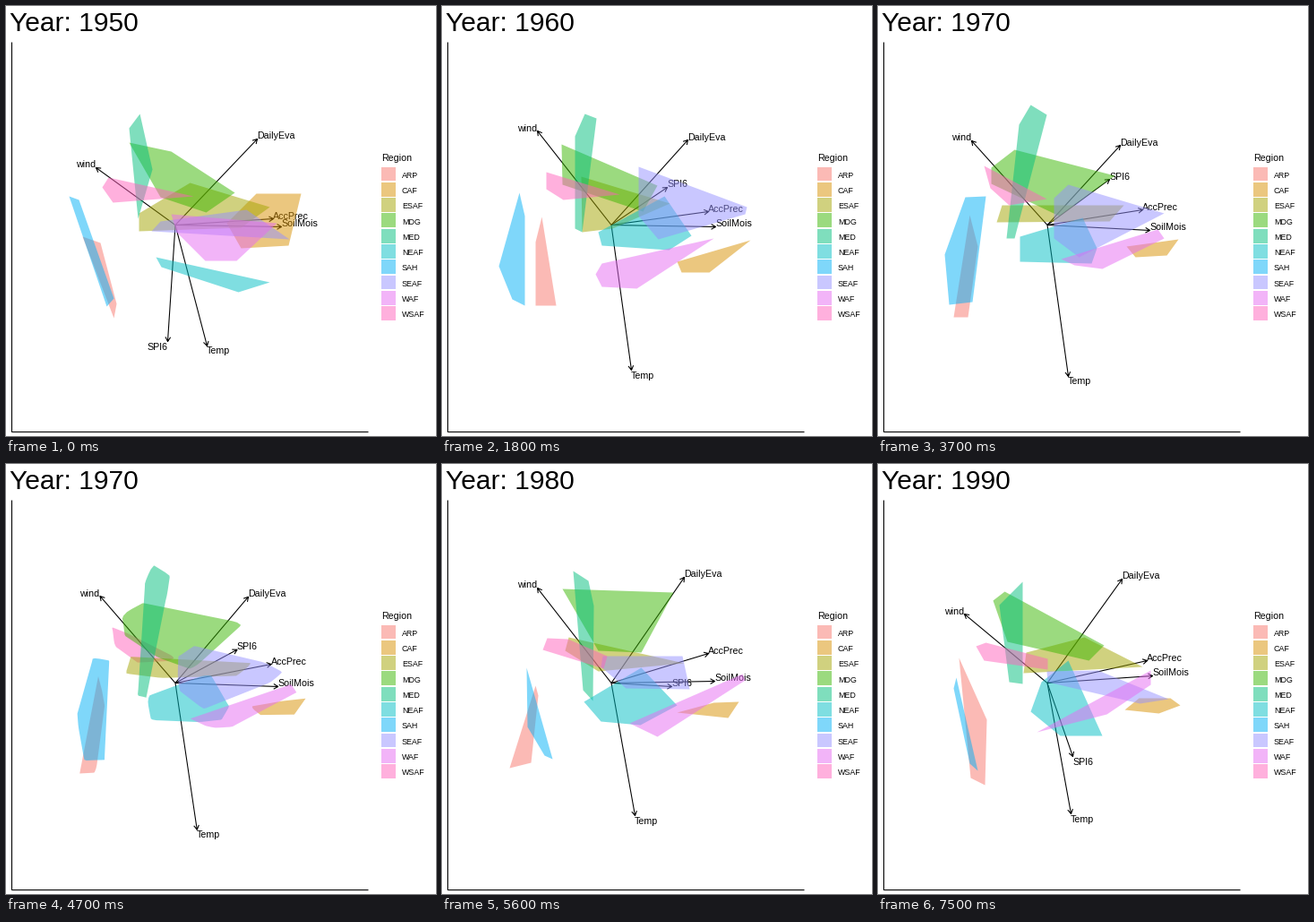
A matplotlib script for the animation above (8 s loop, 480x480 px).

```python
import numpy as np
import matplotlib.pyplot as plt
from matplotlib.animation import FuncAnimation
from matplotlib.patches import Polygon, Rectangle

plt.rcParams.update({"font.family": "Liberation Sans", "toolbar": "None"})

SIZE = 480
FRAMES, INTERVAL = 80, 100
HOLD, STEPS, CYCLE = 6, 12, 19      # first pause, steps per change, frames per decade
FIRST_YEAR = 1950
ORIGIN = np.array([188.5, 244])
MIDDLE = np.array([204, 256])       # labels are pushed away from this point
CAP_HEIGHT = 9
RING_POINTS = 50

regions = {}
arrows = {}


def sort_ring(corners):
    """Order the corners of a convex shape by angle around its middle."""
    corners = np.array(corners, float)
    x, y = (corners - corners.mean(axis=0)).T
    return corners[np.argsort(np.arctan2(y, x))]


def region(name, color, *decades):
    regions[name] = color, [sort_ring(corners) for corners in decades]


def arrow(name, *tips):
    arrows[name] = np.array(tips, float)


# Key corners and arrow tips, one entry per decade.
region("ARP", "#F8766D",
       [(85, 257), (105, 264), (123, 332), (120, 348)],
       [(111, 235), (127, 334), (104, 334), (104, 263)],
       [(102, 233), (111, 268), (100, 347), (84, 347)],
       [(104, 247), (107, 258), (99, 333), (75, 339)],
       [(90, 216), (121, 285), (119, 358), (103, 350)])
region("CAF", "#D89000",
       [(279, 209), (329, 209), (315, 267), (262, 270), (246, 242)],
       [(262, 285), (344, 261), (298, 297), (267, 297)],
       [(277, 268), (335, 260), (322, 278), (287, 280)],
       [(331, 265), (319, 283), (262, 277), (303, 266)],
       [(291, 261), (326, 261), (337, 269), (313, 278), (275, 274)])
region("ESAF", "#A3A500",
       [(148, 251), (148, 231), (205, 197), (294, 224), (262, 247)],
       [(155, 190), (254, 220), (190, 248), (156, 252)],
       [(138, 222), (274, 222), (258, 240), (132, 241)],
       [(141, 193), (270, 222), (174, 231), (137, 208)],
       [(165, 210), (230, 193), (295, 226), (162, 233)])
region("MDG", "#39B600",
       [(137, 152), (184, 162), (255, 208), (223, 230), (172, 213)],
       [(133, 154), (240, 200), (224, 229), (134, 199)],
       [(152, 160), (264, 189), (202, 234), (126, 198), (126, 180)],
       [(134, 139), (258, 143), (222, 210), (174, 208)],
       [(141, 142), (252, 202), (235, 219), (144, 198), (128, 152)])
region("MED", "#00BF7D",
       [(149, 120), (163, 182), (147, 237), (137, 136)],
       [(159, 120), (172, 125), (156, 252), (148, 248), (148, 145)],
       [(170, 110), (188, 121), (152, 259), (143, 259), (157, 132)],
       [(146, 119), (163, 130), (169, 158), (168, 264), (157, 252)],
       [(161, 131), (161, 245), (146, 243), (135, 157)])
region("NEAF", "#00BFC4",
       [(167, 280), (294, 308), (259, 319), (173, 291)],
       [(248, 212), (278, 256), (253, 272), (178, 267), (174, 252)],
       [(158, 257), (228, 236), (244, 270), (238, 287), (158, 285)],
       [(222, 227), (262, 269), (221, 291), (177, 287), (158, 265)],
       [(212, 219), (250, 303), (203, 303), (170, 276), (182, 243)])
region("SAH", "#00B0F6",
       [(70, 212), (81, 216), (120, 326), (112, 335)],
       [(86, 208), (92, 234), (92, 334), (78, 327), (63, 290)],
       [(97, 213), (120, 212), (105, 330), (79, 333), (74, 277)],
       [(94, 227), (123, 329), (114, 325), (95, 293)],
       [(87, 238), (111, 342), (102, 334), (84, 250)])
region("SEAF", "#9590FF",
       [(172, 240), (268, 227), (316, 260), (162, 251)],
       [(219, 179), (340, 224), (338, 232), (241, 260), (219, 234)],
       [(212, 199), (319, 231), (224, 280), (196, 259), (196, 214)],
       [(179, 214), (268, 214), (276, 251), (205, 250), (177, 226)],
       [(188, 231), (245, 230), (324, 262), (292, 267), (189, 243)])
region("WAF", "#E76BF3",
       [(184, 232), (302, 242), (257, 284), (222, 284), (190, 252)],
       [(178, 287), (303, 259), (217, 315), (178, 313), (171, 299)],
       [(204, 282), (312, 249), (319, 259), (250, 293), (219, 289)],
       [(335, 234), (338, 241), (240, 304), (209, 289)],
       [(304, 230), (304, 246), (255, 279), (177, 299)])
region("WSAF", "#FF62BC",
       [(114, 191), (209, 212), (119, 219), (107, 202)],
       [(116, 185), (198, 210), (135, 216), (116, 204)],
       [(118, 178), (188, 215), (146, 222), (125, 203)],
       [(117, 194), (140, 195), (184, 214), (180, 228), (112, 207)],
       [(120, 199), (189, 217), (189, 229), (118, 219), (109, 203)])

arrow("DailyEva", (280, 148), (274, 149), (270, 155), (270, 126), (272, 128))
arrow("wind", (100, 180), (106, 139), (104, 150), (106, 138), (96, 167))
arrow("AccPrec", (298, 237), (297, 229), (295, 227), (297, 211), (300, 219))
arrow("SoilMois", (307, 246), (305, 246), (303, 250), (304, 242), (306, 236))
arrow("SPI6", (180, 374), (251, 202), (258, 193), (256, 248), (217, 326))
arrow("Temp", (224, 379), (211, 406), (212, 413), (215, 392), (215, 390))


def add_points(ring):
    """Insert evenly spaced points along the outline, keeping every corner."""
    extra = RING_POINTS - len(ring)
    closed = np.vstack([ring, ring[:1]])
    sides = np.linalg.norm(np.diff(closed, axis=0), axis=1)
    starts = np.concatenate([[0], np.cumsum(sides)])
    inserted = (np.arange(extra) + 0.5) * starts[-1] / extra
    where = np.sort(np.concatenate([starts[:-1], inserted]))
    return np.column_stack([np.interp(where, starts, axis) for axis in closed.T])


def align(start, end):
    """Pair up the points of two rings with the least total movement."""
    start, end = add_points(start), add_points(end)
    turns = [np.roll(end, k, axis=0) for k in range(RING_POINTS)]
    return start, min(turns, key=lambda ring: ((ring - start) ** 2).sum())


def arrow_path(tip):
    """Shaft plus an open head with 30 degree barbs."""
    dx, dy = ORIGIN - tip
    back = np.arctan2(dy, dx)
    barbs = [tip + 5.7 * np.array([np.cos(back + a), np.sin(back + a)])
             for a in (-np.pi / 6, np.pi / 6)]
    return np.array([ORIGIN, tip, (np.nan, np.nan), barbs[0], tip, barbs[1]])


morphs = {name: [align(a, b) for a, b in zip(shapes, shapes[1:])]
          for name, (_, shapes) in regions.items()}

# Resting shapes stack in legend order, moving ones by their number read as text.
numbered = list(enumerate(regions, start=1))
rest_order = {name: 2 + number / 100 for number, name in numbered}
moving_order = {name: 2 + rank / 100 for rank, (_, name)
                in enumerate(sorted(numbered, key=lambda item: str(item[0])))}

fig = plt.figure(figsize=(SIZE / 72, SIZE / 72), dpi=72, facecolor="white")
ax = fig.add_axes([0, 0, 1, 1])
ax.set(xlim=(-0.5, SIZE - 0.5), ylim=(SIZE - 0.5, -0.5))
ax.axis("off")

line_style = dict(color="black", lw=1.07, solid_capstyle="butt")
ax.plot([5, 5, 403], [39, 474, 474], solid_joinstyle="miter", **line_style)
title = ax.text(4, 28, "", fontsize=30)

ax.text(418.5, 172.5, "Region", fontsize=10.6)
for i, (name, (color, _)) in enumerate(regions.items()):
    middle = 187 + 17.28 * i
    ax.add_patch(Rectangle((418.6, middle - 7.9), 15.8, 15.8, fc=color, alpha=0.5,
                           lw=0))
    ax.text(441.5, middle + 4.3, name, fontsize=8.9)

lines = {name: ax.plot([], [], zorder=1, **line_style)[0] for name in arrows}
labels = {name: ax.text(0, 0, name, fontsize=10.6, zorder=1.5) for name in arrows}
patches = {name: ax.add_patch(Polygon(shapes[0], fc=color, alpha=0.5, lw=0))
           for name, (color, shapes) in regions.items()}


def update(frame):
    stage, step = divmod(max(frame - HOLD, 0), CYCLE)
    t = min(step / STEPS, 1)
    order = moving_order if 0 < t < 1 else rest_order

    title.set_text(f"Year: {FIRST_YEAR + 10 * (stage + (t >= 0.5))}")
    for name, patch in patches.items():
        start, end = morphs[name][stage]
        patch.set_xy(start + (end - start) * t)
        patch.set_zorder(order[name])
    for name, tips in arrows.items():
        tip = tips[stage] + (tips[stage + 1] - tips[stage]) * t
        lines[name].set_data(*arrow_path(tip).T)
        labels[name].set_ha("right" if tip[0] < MIDDLE[0] else "left")
        drop = CAP_HEIGHT if tip[1] > MIDDLE[1] else 0
        labels[name].set_position((tip[0] - 0.5, tip[1] + drop))
    return [title, *patches.values(), *lines.values(), *labels.values()]


anim = FuncAnimation(fig, update, frames=FRAMES, interval=INTERVAL,
                     repeat=True, repeat_delay=0, blit=False)
plt.show()
```
